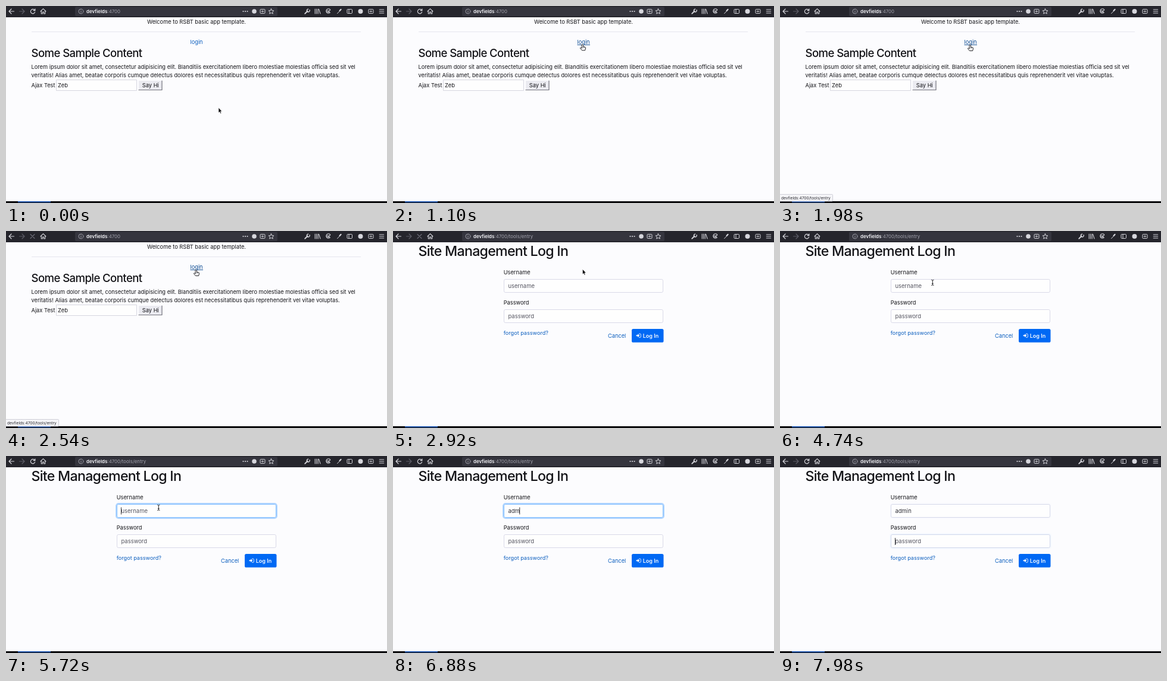
These frames come from a looping animation (640x332 px, 8 s). An HTML page with a canvas:

```html
<!DOCTYPE html>
<html lang="en">
<head>
<meta charset="utf-8">
<title>Sign-in walkthrough</title>
<style>
html, body { margin: 0; width: 100%; height: 100%; overflow: hidden; background: #fcfcfe; }
canvas { display: block; width: 640px; height: 332px; }
</style>
</head>
<body>
<canvas id="stage"></canvas>
<script>
const W = 640, H = 332, LOOP = 8000;
const canvas = document.getElementById('stage');
const ctx = canvas.getContext('2d');
const dpr = window.devicePixelRatio || 1;
canvas.width = W * dpr;
canvas.height = H * dpr;

const INK = '#141418', LINK = '#0c5fbf', HOVER = '#0b4a92', ICON = '#d6d6dc';
const LINE = [217, 217, 232], FOCUS = [128, 189, 255];
const HOST = 'devfields', PORT = ':4700', PATH = '/tools/entry';

// Moments of the story, in ms
const T = {
  hover: 780, status: 1180, click: 2520, load: 2680, loaded: 3700,
  focus: 5050, type: 6400, blur: 7850, tab: 7950
};
const KEY_GAP = 170;

const clamp = v => Math.max(0, Math.min(1, v));
const ease = v => { v = clamp(v); return v * v * (3 - 2 * v); };
const span = (t, from, to) => ease((t - from) / (to - from));
const mix = (a, b, k) => a + (b - a) * k;
const rgb = c => `rgb(${c.map(Math.round)})`;

function setFont(size, weight = 400) {
  ctx.font = `${weight} ${size}px Inter, "Open Sans", sans-serif`;
}

function text(str, x, y, o = {}) {
  setFont(o.size || 9.25, o.weight);
  ctx.letterSpacing = (o.track || 0) + 'px';
  ctx.textAlign = o.align || 'left';
  ctx.fillStyle = o.color || INK;
  ctx.fillText(str, x, y);
  const w = ctx.measureText(str).width;
  ctx.letterSpacing = '0px';
  return w;
}

function rect(x, y, w, h, color) {
  ctx.fillStyle = color;
  ctx.fillRect(x, y, w, h);
}

function box(x, y, w, h, r, fill, line, width = 1) {
  ctx.beginPath();
  ctx.roundRect(x, y, w, h, r);
  if (fill) { ctx.fillStyle = fill; ctx.fill(); }
  if (line) { ctx.strokeStyle = line; ctx.lineWidth = width; ctx.stroke(); }
}

function path(d, x, y, line, width = 1.1, fill) {
  const p = new Path2D(d);
  ctx.save();
  ctx.translate(x, y);
  ctx.lineJoin = ctx.lineCap = 'round';
  if (fill) { ctx.fillStyle = fill; ctx.fill(p); }
  if (line) { ctx.strokeStyle = line; ctx.lineWidth = width; ctx.stroke(p); }
  ctx.restore();
}

function dot(x, y, r, color) {
  ctx.beginPath();
  ctx.arc(x, y, r, 0, Math.PI * 2);
  ctx.fillStyle = color;
  ctx.fill();
}

function panelIcon(x) {
  box(x - 4, 5.5, 8, 7, 1.2, null, ICON);
  path('M-2 0H2M0 -1.5V1.5', x, 9, ICON, 0.9);
}

function toolbar(t) {
  rect(0, 0, W, 19, '#25252c');
  box(116, 1.5, 340, 15.5, 2, '#35353e');

  path('M4.5 0H-4M0 -4L-4 0L0 4', 9, 9, ICON, 1.2);
  path('M-4.5 0H4M0 -4L4 0L0 4', 27, 9, '#5c5c66', 1.2);
  if (t >= T.click && t < T.loaded) {
    path('M-3.5 -3.5L3.5 3.5M3.5 -3.5L-3.5 3.5', 44.5, 9, '#6c6c76', 1.1);
  } else {
    path('M3.2 -1.8A3.7 3.7 0 1 0 3.6 1.2M3.9 -4.2V-1.3H1', 45, 9, ICON, 1.2);
  }
  path('M-4.5 0L0 -4.3L4.5 0M-3.2 -0.8V4H-1V1H1V4H3.2V-0.8', 62.5, 9, ICON);

  path('M4 0A4 4 0 1 1 -4 0A4 4 0 1 1 4 0M0 -0.5V2M0 -2V-1.9', 126, 9, '#a8a8b2', 0.9);
  const w = text(HOST, 135, 12, { size: 7.9, weight: 600, color: '#f6f6fa' });
  text(PORT + (t < T.load ? '' : PATH), 135 + w, 12, { size: 7.9, color: '#a2a2ac' });

  for (const x of [398.5, 402, 405.5]) dot(x, 9, 1.1, ICON);
  dot(417, 9, 3.8, ICON);
  panelIcon(431);
  path('M0 -4.3L1.3 -1.4L4.4 -1.1L2.1 1L2.8 4.1L0 2.5L-2.8 4.1L-2.1 1L-4.4 -1.1L-1.3 -1.4Z', 445.5, 9, ICON, 1);

  path('M-3.8 3.8L0.5 -0.5', 506, 9, ICON, 1.9);
  path('M4.1 -2.3A2.5 2.5 0 1 1 1.8 -3.9', 506, 9, ICON, 1.4);
  path('M-3.8 -4V4M-1.3 -4V4M1.2 -4V4M2.6 -3.6L5 4', 523, 9, ICON, 1.1);
  path('M3.8 -2.6A3.8 3.8 0 1 0 3.5 2L0.5 1.4L3.8 -2.6M-2 -1H1M-2.2 1H0', 541, 9, ICON, 1.1);
  path('M-3.5 3.7L1 -0.8', 560, 9, ICON, 1);
  path('M0.5 -1L2.6 -3.2', 560, 9, ICON, 2.2);
  box(573, 5.5, 8.5, 7, 1.2, null, ICON);
  path('M0 -3V3', 576, 9, ICON, 1);
  dot(595.5, 9, 4, ICON);
  panelIcon(613);
  path('M-3.7 -3H3.7M-3.7 0H3.7M-3.7 3H3.7', 631, 9, ICON, 1.2);
}

function home(t) {
  text('Welcome to RSBT basic app template.', 320, 29.7, { align: 'center' });
  rect(43, 43, 553, 1, '#e6e6ee');
  const hover = t >= T.hover;
  text('login', 320, 64, { align: 'center', color: hover ? HOVER : LINK });
  if (hover) rect(309.5, 65, 21.5, 0.9, HOVER);
  text('Some Sample Content', 42.5, 86, { size: 18.6, weight: 500, track: -0.6 });
  text('Lorem ipsum dolor sit amet, consectetur adipisicing elit. Blanditiis exercitationem libero molestiae molestias officia sed sit vel', 42.5, 105.5);
  text('veritatis! Alias amet, beatae corporis cumque delectus dolores est necessitatibus quis reprehenderit vel vitae voluptas.', 42.5, 119.5);
  text('Ajax Test', 42.5, 136.7);
  box(84.5, 124.5, 135, 18, 0, '#fefefe', '#d6d6e0');
  text('Zeb', 87, 136.7);
  rect(223, 126, 39, 15.5, '#ebebf1');
  path('M0 15.5H39V0', 223, 126, '#73737c', 1.2);
  text('Say Hi', 242.8, 136.7, { align: 'center' });

  if (t >= T.status) {
    box(-1, 317.5, 89.5, 11.5, 1, '#f5f5f8', '#cfcfd8');
    text(HOST + PORT + PATH, 2, 325.8, { size: 6.6, color: '#2a2a30' });
  }
}

function field(y, focus, value, hint) {
  if (focus > 0.01) box(185.1, y - 1.4, 269.8, 24.8, 4, null, `rgba(0,123,255,${0.3 * focus})`, 2.2);
  const line = LINE.map((c, i) => mix(c, FOCUS[i], focus));
  box(186.5, y, 267, 22, 2.3, '#fefefe', rgb(line));
  text(value || hint, 193.5, y + 14.6, { size: 9.45, color: value ? '#2e2e36' : '#555560' });
}

function caret(x, y) {
  rect(x, y, 0.9, 12, '#18181c');
}

function signIn(t) {
  text('Site Management Log In', 42.5, 42.3, { size: 23.2, weight: 500, track: -0.74 });

  const typed = 'admin'.slice(0, Math.max(0, Math.floor((t - T.type) / KEY_GAP) + 1));
  const userFocus = span(t, T.focus, T.focus + 150) * (1 - span(t, T.blur, T.blur + 150));
  const passFocus = span(t, T.tab, T.tab + 150);

  text('Username', 185.7, 73);
  field(81.5, userFocus, typed, 'username');
  text('Password', 185.7, 124);
  field(132.5, passFocus, '', 'password');

  const typing = t >= T.type && t < T.type + 5 * KEY_GAP;
  const blink = Math.floor((t - T.focus) / 600) % 2 === 0;
  if (t >= T.blur + 60) {
    caret(193, 138);
  } else if (t >= T.focus && (typing || blink || t < T.focus + 700)) {
    setFont(9.45);
    caret(193 + ctx.measureText(typed).width, 86.5);
  }

  text('forgot password?', 185.7, 175.4, { size: 9.15, color: LINK });
  text('Cancel', 361, 179.5, { color: LINK });
  box(401, 165, 53.5, 22.8, 2.6, '#0069f4');
  path('M-3.4 -1H-0.8V-3L2.3 0L-0.8 3V1H-3.4Z', 412, 176.3, null, 0, '#f4f8ff');
  path('M0.9 -3H2.8Q3.8 -3 3.8 -2V2Q3.8 3 2.8 3H0.9', 412.5, 176.3, '#f4f8ff', 0.9);
  text('Log In', 419.7, 179.5, { weight: 600, size: 9, color: '#f7faff' });
}

const SHAPES = {
  arrow(x, y) {
    path('M0 0V8.4L1.9 6.7L3.2 9.7L4.6 9.1L3.4 6.1H5.8Z', x, y, '#fafafc', 0.6, '#08080a');
  },
  hand(x, y) {
    path('M-1.2 0.8Q0 -0.7 1.1 0.8V4L4.2 4.6Q5.5 5 5.3 6.5L4.3 10.3H-0.8L-4 6.4Q-3.6 4.7 -1.2 6.4Z', x, y, '#101014', 0.9, '#fafafc');
    path('M1.1 4.5V5.7M3 4.8V6', x, y, '#101014', 0.6);
  },
  beam(x, y) {
    path('M-1.7 -4.6Q0 -4.6 0 -3.4V3.4Q0 4.6 -1.7 4.6M1.7 -4.6Q0 -4.6 0 -3.4M0 3.4Q0 4.6 1.7 4.6M-1 1.6H1', x, y, '#101014', 0.9);
  }
};

function pointer(t) {
  if (t >= T.type) return;
  if (t < T.load) {
    const k = span(t, 20, 840), nudge = span(t, 1200, 1600);
    const x = mix(357, 318.3, k) + nudge;
    const y = mix(171.6, 64.5, k) + nudge * 0.7;
    SHAPES[t >= T.hover ? 'hand' : 'arrow'](x, y);
    return;
  }
  const k = span(t, 3340, 4300);
  const x = mix(318.4, 256.3, k), y = mix(64.6, 87, k);
  SHAPES[y > 81 ? 'beam' : 'arrow'](x, y);
}

function draw(t) {
  ctx.setTransform(dpr, 0, 0, dpr, 0, 0);
  rect(0, 0, W, H, '#fcfcfe');
  rect(0, 329, W, 3, '#0a0a0e');
  rect(20, 329, 55, 2, '#2a5cae');
  (t < T.load ? home : signIn)(t);
  toolbar(t);
  pointer(t);
}

const start = performance.now();
function tick() {
  draw((performance.now() - start) % LOOP);
  requestAnimationFrame(tick);
}
tick();
</script>
</body>
</html>
```
